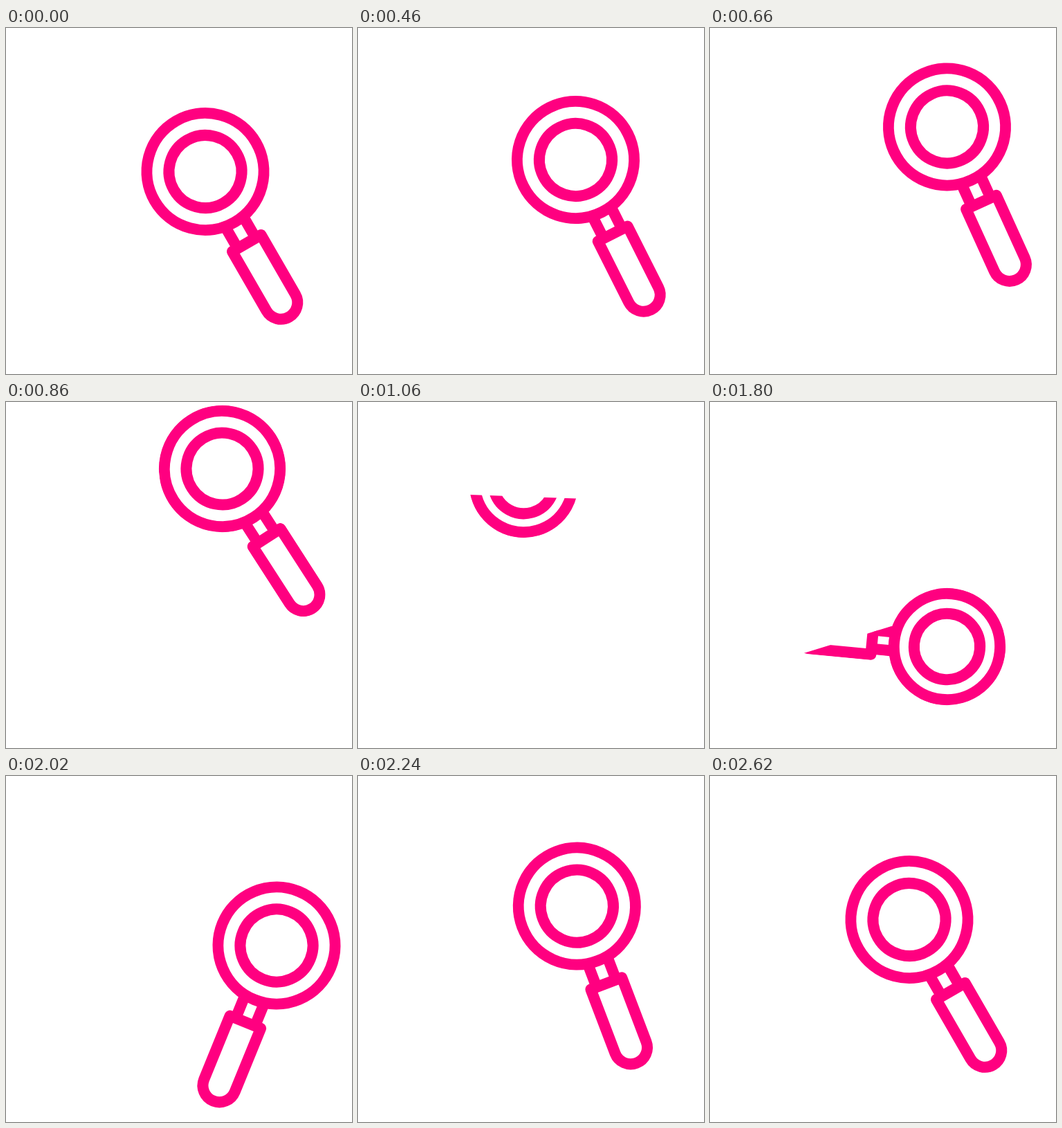
Animation of 500x500 px, one loop 3600 ms. Source, as an HTML page with a canvas:

```html
<!DOCTYPE html>
<html lang="en">
<head>
<meta charset="utf-8">
<title>Magnifier</title>
<style>
html, body { margin: 0; width: 100%; height: 100%; overflow: hidden; background: #fff; }
canvas { display: block; width: 500px; height: 500px; }
</style>
</head>
<body>
<canvas id="stage" width="500" height="500"></canvas>
<script>
const ctx = document.getElementById('stage').getContext('2d');
const LOOP = 3600, STEP = 20, INK = '#ff0080', PEN = 16;
const RING = 84.5, LENS = 52.5, NECK = 15, GRIP = 24, CAP = 119.5, TIP = 218.5;

// Key poses: the lens circles the stage while the handle turns twice
const poses = [
  { t: 40, x: 288, y: 207.5, turn: -30 },
  { t: 460, x: 314.5, y: 190.5, turn: -26.7 },
  { t: 680, x: 343, y: 138, turn: -24.4 },
  { t: 860, x: 312.5, y: 96.5, turn: -32.8 },
  { t: 1120, x: 222, y: 128, turn: -246 },
  { t: 1480, x: 168, y: 286, turn: -423 },
  { t: 1800, x: 342.5, y: 353.5, turn: -624.5 },
  { t: 2020, x: 391, y: 245, turn: -697.8 },
  { t: 2300, x: 298, y: 184, turn: -747 },
  { t: 2440, x: 277, y: 196, turn: -754 },
  { t: 2620, x: 288, y: 207.5, turn: -750 }
];

const clamp = v => Math.min(1, Math.max(0, v));
const progress = (t, from, to) => clamp((t - from) / (to - from));
const rad = d => d * Math.PI / 180;
function ease(t, from, to) {
  const p = progress(t, from, to);
  return p * p * (3 - 2 * p);
}

// Monotone cubic through the poses, at rest at both ends
function speed(i, key) {
  const a = poses[i - 1], b = poses[i], c = poses[i + 1];
  if (!a || !c) return 0;
  const h0 = b.t - a.t, h1 = c.t - b.t;
  const m0 = (b[key] - a[key]) / h0, m1 = (c[key] - b[key]) / h1;
  return m0 * m1 <= 0 ? 0 : 3 * (h0 + h1) / ((2 * h1 + h0) / m0 + (h1 + 2 * h0) / m1);
}
function pose(t, key) {
  let i = 0;
  while (i < poses.length - 2 && t >= poses[i + 1].t) i++;
  const a = poses[i], b = poses[i + 1], p = progress(t, a.t, b.t), q = 1 - p;
  return a[key] + (b[key] - a[key]) * ease(t, a.t, b.t) +
    (b.t - a.t) * p * q * (speed(i, key) * q - speed(i + 1, key) * p);
}

// The shape shrinks on the far side, the pen keeps its width
const size = t => 1 - 0.4 * Math.sin(Math.PI * progress(t, 800, 1990)) ** 2;

// Outer silhouette, clockwise from where the neck leaves the ring
function outline(s) {
  const pad = PEN / 2 + 0.3, pts = [];
  const r = RING * s + pad, neck = NECK * s + pad, grip = GRIP * s, cap = CAP * s, tip = TIP * s;
  const arc = (x, y, rr, from, to, n) => {
    for (let i = 0; i <= n; i++) {
      const a = rad(from + (to - from) * i / n);
      pts.push([x + rr * Math.cos(a), y + rr * Math.sin(a)]);
    }
  };
  const gap = Math.asin(neck / r) * 180 / Math.PI;
  arc(0, 0, r, 90 + gap, 450 - gap, 120);
  pts.push([neck, cap - pad]);
  arc(grip, cap, pad, -90, 0, 6);
  arc(0, tip, grip + pad, 0, 180, 30);
  arc(-grip, cap, pad, 180, 270, 6);
  pts.push([-neck, cap - pad]);
  return pts;
}

// Keep the first part of the silhouette, closed by a straight chord
function clipTo(pts, part) {
  const ends = pts.map((p, i) => pts[(i + 1) % pts.length]);
  const lengths = pts.map((p, i) => Math.hypot(ends[i][0] - p[0], ends[i][1] - p[1]));
  let left = part * lengths.reduce((a, b) => a + b);
  ctx.beginPath();
  ctx.moveTo(...pts[0]);
  for (let i = 0; i < pts.length && left > 0; i++) {
    const [x, y] = pts[i], k = Math.min(1, left / (lengths[i] || 1));
    ctx.lineTo(x + (ends[i][0] - x) * k, y + (ends[i][1] - y) * k);
    left -= lengths[i];
  }
  ctx.closePath();
  ctx.clip();
}

function magnifier(s) {
  const neck = NECK * s, grip = GRIP * s, cap = CAP * s, tip = TIP * s;
  ctx.strokeStyle = INK;
  ctx.lineWidth = PEN;
  ctx.lineJoin = 'round';
  for (const r of [RING, LENS]) {
    ctx.beginPath();
    ctx.arc(0, 0, r * s, 0, 2 * Math.PI);
    ctx.stroke();
  }
  ctx.beginPath();
  for (const x of [-neck, neck]) {
    ctx.moveTo(x, Math.sqrt((RING * s) ** 2 - x * x));
    ctx.lineTo(x, cap);
  }
  ctx.stroke();
  ctx.beginPath();
  ctx.moveTo(-grip, cap);
  ctx.lineTo(grip, cap);
  ctx.lineTo(grip, tip);
  ctx.arc(0, tip, grip, 0, Math.PI);
  ctx.closePath();
  ctx.stroke();
}

function draw(t) {
  ctx.fillStyle = '#fff';
  ctx.fillRect(0, 0, 500, 500);
  if (t >= 1180 && t < 1480) return;
  const s = size(t);
  ctx.save();
  ctx.translate(pose(t, 'x'), pose(t, 'y'));
  ctx.rotate(rad(pose(t, 'turn')));
  if (t > 830 && t < 1180) {
    // Wiping out begins at the side of the ring
    const pts = outline(s), first = 39;
    clipTo([...pts.slice(first), ...pts.slice(0, first)], 1 - ease(t, 830, 1180));
  } else if (t >= 1480 && t < 2010) {
    clipTo(outline(s), ease(t, 1370, 2010));
  }
  magnifier(s);
  ctx.restore();
}

const begin = performance.now();
function tick() {
  const t = (performance.now() - begin) % LOOP;
  draw(Math.floor(t / STEP) * STEP);
  requestAnimationFrame(tick);
}
tick();
</script>
</body>
</html>
```
